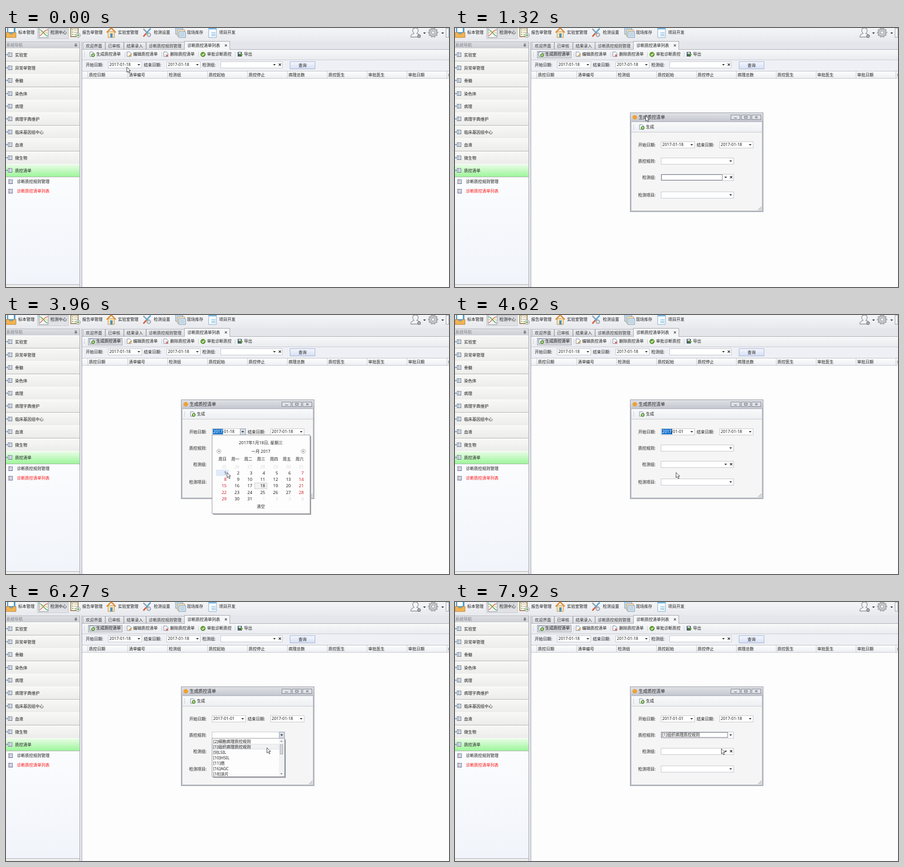
Recreate the animation shown at these times as an HTML page with a canvas. Size 977 by 573 pixels, loop 8 s.

```html
<!DOCTYPE html>
<html lang="zh-CN">
<head>
<meta charset="utf-8">
<style>
html, body { margin: 0; width: 100%; height: 100%; overflow: hidden; background: #fdfdfd; }
canvas { display: block; }
</style>
</head>
<body>
<canvas id="stage" width="977" height="573"></canvas>
<script>
const g = document.getElementById('stage').getContext('2d');
const LOOP = 8000;

// [time, x, y] of the pointer tip
const POINTER = [
  [0, 266, 86], [330, 239, 61], [660, 343, 122], [990, 402, 173], [1320, 420, 194],
  [1650, 498, 262], [1980, 523, 260], [3300, 523, 323], [3630, 533, 336], [3960, 487, 348],
  [4950, 569, 327], [5280, 602, 301], [5610, 605, 295], [5940, 596, 305], [6270, 575, 322],
  [6600, 565, 307], [6930, 556, 316], [7590, 585, 323], [7920, 587, 324]
];

function text(s, x, y, color = '#1c1c1c', size = 9, align = 'left') {
  g.font = size + 'px "Noto Sans", "Noto Sans CJK SC", "Noto Sans CJK", sans-serif';
  g.textAlign = align;
  g.fillStyle = color;
  g.fillText(s, x, y + 3.4);
}

function fade(y, h, top, bottom) {
  const f = g.createLinearGradient(0, y, 0, y + h);
  f.addColorStop(0, top);
  f.addColorStop(1, bottom);
  return f;
}

function box(x, y, w, h, fill, border) {
  g.fillStyle = border || fill;
  g.fillRect(x, y, w, h);
  if (!border) return;
  g.fillStyle = fill;
  g.fillRect(x + 1, y + 1, w - 2, h - 2);
}

function shape(d, x, y, fill, stroke, width = 1) {
  const p = new Path2D(d);
  g.save();
  g.translate(x, y);
  if (fill) { g.fillStyle = fill; g.fill(p); }
  if (stroke) { g.strokeStyle = stroke; g.lineWidth = width; g.stroke(p); }
  g.restore();
}

function disc(x, y, r, fill, stroke, width = 1) {
  g.beginPath();
  g.arc(x, y, r, 0, 7);
  if (fill) { g.fillStyle = fill; g.fill(); }
  if (stroke) { g.strokeStyle = stroke; g.lineWidth = width; g.stroke(); }
}

const hline = (x, y, w, c) => box(x, y, w, 1, c);
const vline = (x, y, h, c) => box(x, y, 1, h, c);
const arrow = (x, y) => shape('M-3 -1H3L0 2Z', x, y, '#222');
const cross = (x, y, c = '#222', r = 2.5) =>
  shape(`M${-r} ${-r}L${r} ${r}M${r} ${-r}L${-r} ${r}`, x, y, null, c, 1.3);
const grip = (x, y) => { for (let i = 0; i < 4; i++) box(x, y + i * 3, 2, 1, '#b4b6bc'); };

function sheet(x, y) {
  shape('M-4 -5H2L5 -2V5H-4Z', x, y, '#f6f9fd', '#70819a');
}

function newIcon(x, y) {
  sheet(x - 1, y);
  disc(x + 2, y + 2, 3.6, '#5c9f2a', '#3d7718', .7);
  shape('M0 -2V2M-2 0H2', x + 2, y + 2, null, '#fff', 1.2);
}

function topBar() {
  box(0, 0, 977, 30, fade(0, 30, '#f4f5f7', '#e8e9ed'));
  box(69, 0, 69, 24, fade(0, 24, '#d6d8dc', '#e2e4e8'), '#c3c5ca');
  // tray
  shape('M3 0H20V12H3Z', 0, 0, '#58a9d4', '#387aa3');
  box(5, 0, 12, 9, '#fff');
  shape('M0 10H7L9 14H14L16 10H22V21H0Z', 0, 0, '#f1b453', '#bb792b');
  // chart
  shape('M73 0H93V21H73Z', 0, 0, '#f5f7f7', '#88909a');
  shape('M74 17C79 17 83 4 92 4', 0, 0, null, '#d96343', 1.6);
  shape('M74 4C81 4 83 15 92 18', 0, 0, null, '#45a45a', 1.6);
  shape('M74 11Q80 5 92 12', 0, 0, null, '#d6ad43');
  // clipboard
  shape('M143 0H159V19H143Z', 0, 0, '#fbf7e7', '#9d7c4d', 1.8);
  for (let i = 0; i < 3; i++) {
    box(146, 3 + i * 5, 2, 2, '#5b9440');
    hline(150, 4 + i * 5, 7, '#92969d');
  }
  disc(159, 16, 4.8, '#f4f6f4', '#777f83');
  shape('M-3 0H3M0 -3V3', 159, 16, null, '#5b9b41', 1.4);
  // house
  shape('M225 8H239V21H225Z', 0, 0, '#f8e3ae', '#b88843');
  shape('M222 10L232 0L242 10', 0, 0, null, '#e28a30', 2.8);
  box(230, 12, 5, 9, '#4f91bd');
  // tools
  shape('M303 2L318 17', 0, 0, null, '#94a1ad', 3);
  shape('M319 1L309 12', 0, 0, null, '#58a5d5', 3);
  shape('M309 12L303 19', 0, 0, null, '#d95a3a', 3.2);
  disc(315, 15, 4, '#d9dee2', '#848c94', 1.5);
  // stock
  shape('M374 0H390V14H374Z', 0, 0, '#c6dff1', '#6899bd');
  shape('M378 4H394V18H378Z', 0, 0, '#f4e5c8', '#b38e5c');
  shape('M381 8H396V21H381Z', 0, 0, '#e4eff7', '#6488a6');
  for (let i = 0; i < 3; i++) hline(383, 11 + i * 3, 11, '#81a7c3');
  // document
  shape('M447 0H464V21H447Z', 0, 0, '#f9fcff', '#78a3c7');
  box(447, 0, 17, 3, '#75b5e2');
  box(453, 9, 9, 9, '#b9d9ef');
  hline(453, 12, 9, '#fff');

  [['标本管理', 27], ['检测中心', 98], ['报告单管理', 168], ['实验室管理', 247],
   ['检测设置', 326], ['现场库存', 399], ['项目开发', 470]].forEach(([s, x]) => text(s, x, 10));

  // account and settings
  shape('M893 20C892 14 898 13 900 12C895 7 896 0 903 0S911 7 906 12C909 13 913 14 912 20Z',
    0, 0, '#f3f4f5', '#858a90', 1.3);
  disc(911, 18, 3, '#b4b7bb', '#777', 1.5);
  for (let i = 0; i < 10; i++) {
    const a = i * Math.PI / 5;
    disc(942 + 9 * Math.cos(a), 10 + 9 * Math.sin(a), 2, '#b8bbbe', '#85898d', .7);
  }
  disc(942, 10, 8, '#c9cbce', '#989ca0');
  disc(942, 10, 3.5, '#f2f3f4', '#85898d');
  arrow(923, 11);
  arrow(963, 11);
  box(970, 0, 7, 21, '#f6f8fb', '#8f9bab');
}

function listIcon(x, y, blue) {
  box(x - 4, y - 5, 10, 10, blue ? '#f5f8ff' : '#f4f6f8', blue ? '#6884b5' : '#8592a2');
  for (let i = -3; i < 4; i += 3) {
    box(x - 2, y + i - 1, 2, 2, blue ? '#cc6a5b' : '#6d83a3');
    hline(x + 1, y + i, 4, '#7388a8');
  }
}

function sidebar() {
  box(0, 30, 163, 543, fade(330, 240, '#fbfcfe', '#f1f4fa'));
  box(0, 30, 163, 16, fade(30, 16, '#dfe0e4', '#ccced3'));
  hline(0, 30, 163, '#b4b6bd');
  text('系统导航', 1, 38, '#7d828c');
  shape('M-1.5 -3H1.5V1H-1.5ZM-3 1H3M0 1V4', 154, 38, null, '#555', 1);
  ['实验室', '异常单管理', '骨髓', '染色体', '病理', '病理字典维护', '临床基因组中心',
   '血液', '微生物', '质控清单'].forEach((s, i) => {
    const y = Math.round(45.4 + i * 28.4);
    box(0, y, 162, 28, i == 9 ? fade(y, 28, '#ecfdea', '#9df59a') : fade(y, 28, '#f8f8f6', '#ececea'));
    hline(0, y, 162, '#fff');
    hline(0, y + 28, 162, '#a9abae');
    listIcon(8, y + 14);
    shape('M0 -2L3 0L0 2Z', 1, y + 14, '#607a9c');
    text(s, 20, y + 14.5);
  });
  listIcon(9, 340, true);
  text('诊断质控规则管理', 24, 339.5);
  listIcon(9, 361, true);
  text('诊断质控清单列表', 24, 360.5, '#ff1010');
  hline(0, 567, 162, '#a3a6ab');
  box(0, 568, 162, 5, '#eeeeed');
  vline(162, 30, 543, '#a3a6ad');
  box(163, 30, 4, 543, '#e3e5ea');
  vline(167, 30, 543, '#9a9da5');
}

function field(x, y, w, value = '', button) {
  box(x, y, w, 15, '#fff', '#bfc2c9');
  if (button) box(x + w - 13, y, 13, 15, button == 'hover' ? '#cfdff5' : '#d4d8e0', '#8fa0bb');
  arrow(x + w - 7, y + 7);
  text(value, x + 3, y + 7);
}

function groupField(x, y, w) {
  box(x, y, w, 15, '#fff', '#bfc2c9');
  arrow(x + w - 18, y + 7);
  cross(x + w - 6, y + 7);
}

function mainArea(t) {
  box(168, 30, 809, 543, '#fdfdfd');
  box(168, 30, 809, 18, '#e5e6eb');
  hline(168, 47, 809, '#a3a6ae');
  [['欢迎界面', 170, 49], ['已审核', 219, 41], ['结果录入', 260, 49], ['诊断质控规则管理', 309, 85]]
    .forEach(([s, x, w]) => {
      box(x, 31, w, 17, fade(31, 17, '#eeeff2', '#d9dbe0'), '#aaadb5');
      text(s, x + 6, 39.5, '#333');
    });
  box(393, 29, 101, 19, '#f5f6f8', '#9da0a8');
  box(394, 46, 99, 2, '#f5f6f8');
  text('诊断质控清单列表', 400, 38.5);
  cross(485, 38.5, '#555', 2.2);

  box(168, 48, 809, 23, fade(48, 23, '#f7f8f9', '#eaebef'));
  hline(168, 70, 809, '#c5c7cd');
  grip(172, 53);
  if (t >= 1320) box(181, 51, 76, 16, fade(51, 16, '#c5c8cf', '#dcdee3'), '#a0a4ad');
  newIcon(190, 58);
  sheet(271, 58);
  shape('M-3 3L3 -3', 274, 60, null, '#d79a32', 2.4);
  sheet(352, 58);
  cross(355, 61, '#cf3d31', 2.4);
  disc(434.5, 58.5, 5, '#67a934', '#427819');
  shape('M-2.5 0L-.5 2L3 -2', 434.5, 58.5, null, '#fff', 1.4);
  box(511, 53, 9, 10, '#4e6680', '#32475d');
  box(513, 54, 5, 3, '#fff');
  shape('M-3 0H1V-2L5 1L1 4V2H-3Z', 517, 58, '#69b33d', '#32691e', .6);
  ['生成质控清单', '编辑质控清单', '删除质控清单', '审批诊断质控', '导出'].forEach((s, i) => {
    text(s, 199 + i * 81.5, 58);
    if (i) vline(Math.round(180.5 + i * 81.2), 53, 11, '#c5c7cd');
  });

  box(168, 71, 809, 25, '#eff0f5');
  text('开始日期:', 176, 82);
  field(225, 74, 75, '2017-01-18');
  text('结束日期:', 304, 82);
  field(354, 74, 75, '2017-01-18');
  text('检测组:', 433, 82);
  groupField(473, 74, 137);
  const focus = t >= 660 && t < 1320;
  box(626, 74, 56, 17, fade(74, 17, '#f5f8ff', '#d5def2'), focus ? '#5369a0' : '#9caed1');
  if (focus) box(628, 76, 52, 13, fade(76, 13, '#eaf0fc', '#cfdaf1'), '#6f83b4');
  text('查询', 654, 82.5, '#1c1c1c', 9, 'center');

  box(168, 96, 809, 16, fade(96, 16, '#fdfdfe', '#eceef1'));
  hline(168, 95, 809, '#b9bcc3');
  hline(168, 111, 809, '#bfc2c8');
  ['质控日期', '清单编号', '检测组', '质控起始', '质控停止', '病理总数', '质控医生', '审批医生', '审批日期', '备注']
    .forEach((s, i) => {
      const x = Math.round(179.5 + i * 88.1);
      vline(x, 96, 16, '#c3c6cc');
      text(s, x + 3, 104);
    });
}

function titleButtons(xs, y, w, color, fill) {
  xs.forEach((x, i) => {
    box(x, y, w, 11, fill, color);
    const cx = x + w / 2, cy = y + 5.5;
    if (i == 0) box(cx - 3, cy + 1, 6, 1.5, color);
    else if (i == 1) shape('M-3 -2H3V2H-3Z', cx, cy, null, color, 1.3);
    else cross(cx, cy, color, 2.3);
  });
}

function openingDialog() {
  box(389, 190, 287, 214, '#e0e1e4', '#cfd0d4');
  box(390, 191, 285, 18, fade(191, 18, '#e9eaed', '#dcdde1'));
  box(392, 209, 281, 193, '#fdfdfd', '#d2d3d7');
  disc(400, 200, 4.5, '#f5cf91');
  text('生成质控清单', 408, 200, '#888a90', 9.5);
  titleButtons([606, 628, 651], 194, 21, '#b3b5ba', '#ececef');
}

function startDate(t) {
  const open = t >= 2970 && t < 4620;
  const day = t < 4620 ? '18' : '01';
  const button = open ? 'down' : t >= 1980 && t < 2970 ? 'hover' : '';
  field(454, 251, 75, '2017-01-' + day, button);
  if (t < 2640 || t >= 5940) return;
  const w = g.measureText('2017').width;
  box(456, 252, w + 2, 12, '#1874cd');
  text('2017', 457, 258, '#fff');
  if ((t >= 3630 && t < 3960) || (t >= 4620 && t < 5280)) vline(478, 252, 12, '#222');
}

function dialog(t) {
  box(386, 187, 294, 220, '#c9ccd3', '#8e929c');
  box(387, 188, 292, 19, fade(188, 19, '#dfe1e6', '#c3c6ce'));
  box(388, 207, 290, 198, '#f5f5f5', '#a9adb6');
  box(389, 208, 288, 22, fade(208, 22, '#f9fafb', '#eeeff2'));
  hline(389, 230, 288, '#c2c5cc');
  disc(396.5, 197.5, 5, '#f0a035');
  text('生成质控清单', 405, 198, '#222', 9.7);
  titleButtons([608, 631, 654], 192, 21, '#777c86', '#dfe1e6');
  grip(393, 214);
  newIcon(412, 219);
  text('生成', 421, 219);
  for (let i = 0; i < 3; i++)
    shape(`M${-2 - i * 3} 0L0 ${-2 - i * 3}`, 676, 403, null, '#8d9098');

  text('开始日期:', 404, 258.5);
  text('结束日期:', 533, 258.5);
  text('质控规则:', 404, 294.5);
  text('检测组:', 413, 330.5);
  text('检测项目:', 404, 370);
  startDate(t);
  field(583, 251, 75, '2017-01-18');
  const picked = t >= 7260;
  const listOpen = t >= 5940 && !picked;
  field(454, 287, 161, '', listOpen ? 'down' : t >= 5610 && !picked ? 'hover' : '');
  if (picked) {
    box(455, 288, 147, 12, '#fff', '#6e727a');
    text('[1]组织病理质控规则', 457, 294);
  }
  groupField(454, 323, 161);
  if (t < 2640 + 330) box(455, 324, 135, 13, '#fff', '#777b83');
  field(454, 362, 161);
  if (t >= 2970 && t < 4620) calendar(t >= 3960);
  if (listOpen) ruleList(t >= 6270 && t < 6600 || t >= 6930 ? 1 : 0);
}

function calendar(hot) {
  box(457, 268, 216, 174, '#a4a5a8');
  box(454, 265, 217, 175, '#fdfdfd', '#8c8f95');
  text('2017年1月18日, 星期三', 562, 283, '#222', 9.2, 'center');
  text('一月 2017', 562, 302, '#222', 9.2, 'center');
  [[469, 1], [655, -1]].forEach(([x, d]) => {
    disc(x + .5, 301.5, 4.5, '#f7f7f7', '#9a9da2');
    shape(`M${d} -2L${-d * 1.5} 0L${d} 2Z`, x + .5, 301.5, '#555');
  });
  if (hot) box(463, 342, 28, 14, '#e1eafa');
  box(548, 371, 28, 14, '#f1f2f1', '#c9cbca');
  for (let col = 0; col < 7; col++) {
    const x = 486.5 + col * 28.35;
    text('周' + '日一二三四五六'[col], x, 318.5, '#222', 9, 'right');
    for (let row = 0; row < 6; row++) {
      const n = row * 7 + col - 6;
      const day = n < 1 ? n + 31 : n > 31 ? n - 31 : n;
      const red = col % 6 == 0 && !(hot && n == 1);
      const color = day != n ? '#d9d9da' : red ? '#cc1f2c' : '#222';
      text(day, x, 335.3 + row * 14.2, color, 9.5, 'right');
    }
  }
  text('清空', 562, 424, '#222', 9, 'center');
}

function ruleList(hot) {
  box(457, 304, 160, 85, '#9c9ea3');
  box(454, 301, 161, 86, '#fdfdfd', '#8c8f95');
  box(455, 302 + hot * 12, 147, 12, '#f0f1f2', '#dcdee0');
  ['[2]细胞病理质控规则', '[1]组织病理质控规则', '[9]LSIL', '[10]HSIL', '[11]癌', '[16]AGC', '[18]涂片']
    .forEach((s, i) => text(s, 457, 308.3 + i * 12));
  box(602, 302, 12, 84, '#f1f2f4');
  box(604, 315, 7, 22, '#d4d6db', '#a5a8af');
  shape('M-2.5 1H2.5L0 -1.5Z', 607.5, 308, '#777');
  shape('M-2.5 -1H2.5L0 1.5Z', 607.5, 380, '#777');
}

function draw(t) {
  topBar();
  mainArea(t);
  sidebar();
  if (t >= 1320) dialog(t);
  else if (t >= 990) openingDialog();
  const [, x, y] = POINTER.filter(p => p[0] <= t).pop();
  shape('M0 0V11.5L2.7 9L4.8 13.5L6.7 12.6L4.7 8.2H8.2Z', x + .5, y + .5, '#fff', '#222', .9);
}

const start = performance.now();
function tick() {
  draw((performance.now() - start) % LOOP);
  requestAnimationFrame(tick);
}
tick();
</script>
</body>
</html>
```
